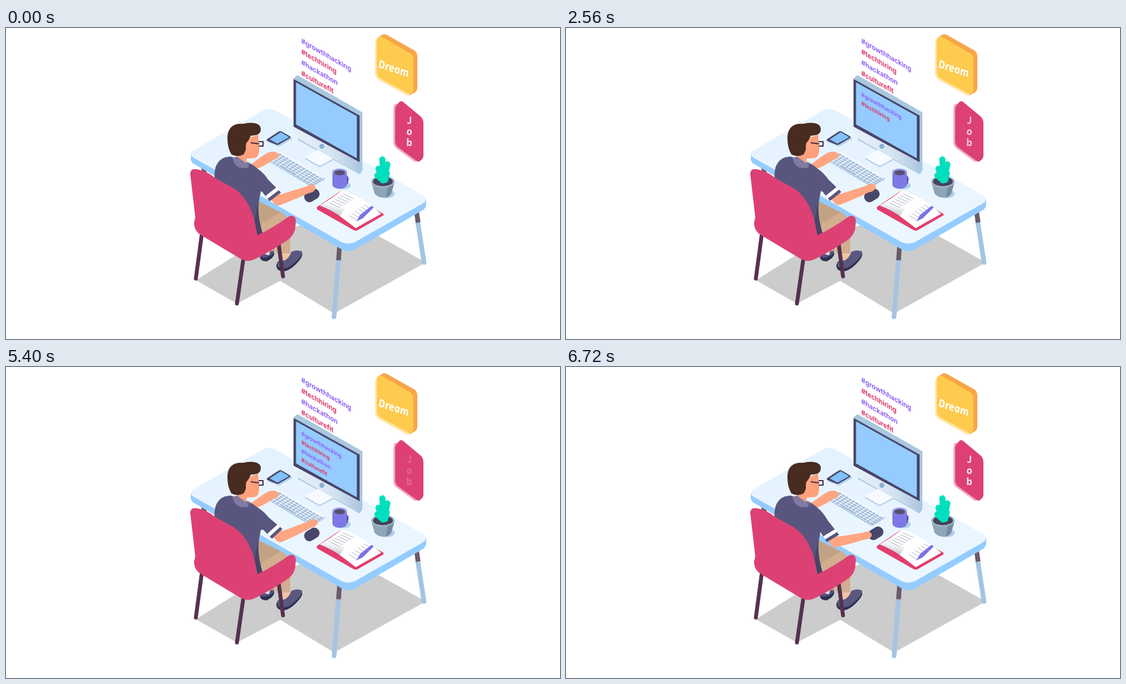
These frames come from a looping animation (998 px wide and 561 px high, 6800 ms). An HTML page:

```html
<!DOCTYPE html>
<html lang="en">
<head>
<meta charset="utf-8">
<title>Desk scene</title>
<style>
html, body { margin: 0; width: 100%; height: 100%; overflow: hidden; background: #fff; }
svg { display: block; width: 100vw; height: 100vh; }
.tags { font: 700 13px Inter, sans-serif; }
.dream { font: italic 600 18.5px "Noto Sans", sans-serif; fill: #fff; }
.job { font: 700 17px "Noto Sans Mono", monospace; fill: #fff; text-anchor: middle; }
.leg { fill: none; stroke-linecap: round; stroke-width: 7; }
</style>
</head>
<body>
<svg viewBox="0 0 998 561">
  <defs>
    <linearGradient id="page" x1=".35" y1="1" x2=".6" y2=".35"><stop offset="0" stop-color="#b9c1ca"/><stop offset=".6" stop-color="#fff"/></linearGradient>
    <linearGradient id="chin"><stop offset="0" stop-color="#e8f1fa"/><stop offset=".6" stop-color="#d5e4f2"/><stop offset="1" stop-color="#afc8e0"/></linearGradient>
    <linearGradient id="top" x2="0" y2="1"><stop offset="0" stop-color="#e3f2ff"/><stop offset="1" stop-color="#edf7ff"/></linearGradient>
  </defs>

  <path fill="#ccc" d="M342 455 416 497 494 456 591 515 756 423 600 335 500 365 430 400Z"/>

  <!-- desk -->
  <g class="leg" style="stroke-width:8.5">
    <path stroke="#a5c4e3" d="M600 405 591 521M741 345 753 423"/>
    <path stroke="#6b5b69" stroke-linecap="butt" d="M601 392 599 419M739 328 742.5 351M356 250 358 268"/>
  </g>
  <path fill="#94ccff" d="M333 226V238Q334 243 340 246L604 399Q617 406 630 399L750 329Q757 325 757 318V308L617 380Z"/>
  <path fill="url(#top)" d="M337 221 462 149Q473 143 486 149L750 301Q763 309 750 317L629 386Q617 392 604 386L338 234Q328 227 337 221Z"/>

  <!-- phone -->
  <path fill="#b9d3ec" d="M471 206 492 214 516 200 512 196Z"/>
  <path fill="#49486a" d="M471 200 491 187Q494 185 497 187L511 195Q514 197 511 199L492 210Q489 212 486 210L471 204Q468 202 471 200Z"/>
  <path fill="#82c1fa" d="M475 201 495 188 510 197 489 208.500Z"/>

  <!-- monitor -->
  <path fill="#a9c5df" d="M526 198 640 260 637 264 526 202Z"/>
  <path fill="#bcd3e8" d="M538 236 562 250Q565 252 568 250L590 238V235L560 220Z"/>
  <path fill="#f7fbff" d="M538 233 562 247Q565 249 568 247L590 235 563 219Z"/>
  <path fill="#a9c7df" d="M518 91 525 85 642 152V257L636 263Z"/>
  <path fill="url(#chin)" d="M518 176 636 239V263L520 196Q518 195 518 191Z"/>
  <path fill="#48466a" d="M518 92 637 158V242L518 178Z"/>
  <path fill="#95cbff" d="M522.500 98 632 159V235L522.500 174Z"/>
  <circle cx="569" cy="213.500" r="4.500" fill="#8fb0d1"/>

  <!-- keyboard -->
  <path fill="#aac6e1" d="M469 238 551 287 574 273V270L492 226Z"/>
  <path fill="#f1f8ff" d="M469 236 551 284 574 270 492 222Z"/>
  <g id="keys" fill="#9fb9d6" transform="matrix(6.1 3.6 -4 2.5 492 225)"></g>

  <!-- mug -->
  <ellipse cx="607" cy="284" rx="14" ry="7" fill="#b4cfe9"/>
  <path fill="none" stroke="#5d57b5" stroke-width="3.500" d="M611 268Q617 267 615 276Q614 283 609 283"/>
  <path fill="#7d78e3" d="M588 259V283Q590 290 601 290Q612 290 614 283V259Z"/>
  <ellipse cx="601" cy="259.500" rx="13" ry="6" fill="#9c97f5"/>
  <ellipse cx="601" cy="261" rx="10" ry="4.500" fill="#57506b"/>

  <!-- plant -->
  <ellipse cx="685" cy="299" rx="15" ry="8" fill="#b4cfe9"/>
  <path fill="#8ea5b9" d="M658 277 664 299Q670 306 679 306Q689 306 694 299L700 277Z"/>
  <path fill="#748da3" d="M688 286 684 306Q691 304 694 299L700 277Z"/>
  <ellipse cx="679" cy="277" rx="21" ry="10.500" fill="#a9bccb"/>
  <ellipse cx="679" cy="277" rx="18" ry="8.500" fill="#46445e"/>
  <path fill="none" stroke="#00dfbd" stroke-width="11" stroke-linecap="round" d="M678 237 680 274M687 246 682 268M671 254 677 270M669 266 679 275M686 262 683 274"/>

  <!-- book -->
  <path fill="#e23e6d" d="M560 323 603 294 680 335V338L633 365Q630 366 627 365L560 327Z"/>
  <path fill="url(#page)" d="M565 320Q583 310 605 293Q613 294 640 308Q618 320 601 339Q589 330 565 320Z"/>
  <path fill="#fff" d="M601 339Q620 311 641 308L676 335 630 361Z"/>
  <g id="rules" stroke="#a3acb8"></g>
  <path fill="#7a72e8" d="M631 349 638 337 657 322Q661 320 662 324L643 343Z"/>

  <!-- legs and shoes -->
  <path fill="#55527a" d="M457 410Q470 407 483 397V409Q480 417 470 420Q459 421 457 410Z"/>
  <path fill="#dbe7f1" d="M462 407 476 401 474 410Z"/>
  <path fill="#2d2f52" d="M457 412Q466 419 484 406 482 414 470 421Q458 421 457 412Z"/>
  <path fill="#c3a184" d="M454 312 500 335 480 355 484 402 470 404 450 370Z"/>
  <path fill="#d2ae8e" d="M461 352 497 332 507 342 512 375V406Q500 411 486 406L484 378 458 378Z"/>
  <path fill="#f1c5a5" d="M492 407H514V413Q508 423 494 422Z"/>
  <path fill="#2d2f52" d="M487 426 533 406Q536 411 526 422 512 438 500 439 488 439 487 429Z"/>
  <path fill="#5a577f" d="M488 424Q490 419 497 420 508 420 514 404 523 399 533 403 535 409 526 418 511 434 500 434 488 434 488 424Z"/>

  <!-- left arm, torso, head -->
  <path id="left" fill="#ffa581" d="M436 250Q463 229 474 224Q489 221 492 229Q492 236 480 238Q463 252 441 257Z"/>
  <path fill="#58567e" d="M376 275C373 248 384 232 405 232L438 243Q454 252 464 266L458 300Q450 330 462 370L453 376 415 330Z"/>
  <path fill="#454468" d="M456 306Q450 330 462 370L453 376 448 345Z"/>
  <path fill="#ffa07b" d="M416 220 435 200 454 192 456 214Q457 230 450 234Q442 236 434 235L433 245 416 236Z"/>
  <path fill="#7f7ba3" d="M408 234 416 232 433 244 438 242 441 252 424 253Q410 249 408 234Z"/>
  <path fill="#482b21" d="M399 201C398 182 408 171 427 173C440 169 460 170 459 183C459 192 450 194 441 194Q437 204 433 207Q433 222 428 228Q417 234 406 228Q399 216 399 201Z"/>
  <ellipse cx="437" cy="213" rx="5" ry="8" fill="#ffa581"/>
  <path fill="none" stroke="#412640" stroke-width="2" d="M441 207 456 209M455 205 463 205V213L455 213"/>

  <!-- mouse and right arm -->
  <rect id="mouse" x="-14.500" y="-9.500" width="29" height="19" rx="9" fill="#48466a"/>
  <path id="forearm" fill="#ffa581"/>
  <path id="elbow" stroke="#ffa581" stroke-width="18" stroke-linecap="round"/>
  <ellipse id="hand" rx="10" ry="7" fill="#ffa581"/>
  <path id="sleeve" fill="#58567e"/>
  <path id="band" stroke="#fff" stroke-width="6.500"/>

  <!-- chair -->
  <path class="leg" stroke="#553150" d="M353 370 342 452M428 414 416 497M491 388 499 448"/>
  <path fill="#dd4174" d="M332 264C332 256 336 253 345 255Q362 258 376 270L410 289Q436 306 447 345L453 374Q485 358 508 341C516 336 523 340 522 350L521 362Q518 376 505 384Q470 407 450 416Q436 424 422 416L352 374Q338 366 339 350L341 342Z"/>

  <!-- wall tiles -->
  <path fill="#ffe5a6" d="M665 28Q665 15 676 20L724 48Q731 52 731 61V114Q731 125 721 121L673 95Q665 90 665 82Z"/>
  <path fill="#f7a549" d="M669 18 678 12Q682 10 687 13L735 40Q741 44 741 52V107Q741 113 737 116L728 121Z"/>
  <path fill="#ffcb4e" d="M668 25Q668 12 679 17L727 45Q734 49 734 58V111Q734 122 724 118L676 92Q668 87 668 79Z"/>
  <text class="dream" transform="matrix(.94 .31 0 1.1 671 71)">Dream</text>
  <path fill="#f1a9c2" transform="translate(-3 2)" d="M701 147 702 136 712 133 745 158 752 230 740 240 706 215Q701 211 701 204Z"/>
  <path fill="#dd4174" d="M701 147Q701 142 705 138L709 133Q711 131 715 133L745 158Q752 163 752 172V230Q752 235 748 238Q744 243 740 240L706 215Q701 211 701 204Z"/>
  <g id="job" class="job"><text x="726.500" y="173">J</text><text x="726.500" y="193">o</text><text x="726.500" y="213">b</text></g>

  <g id="fixed" class="tags" transform="translate(532 27)"></g>
  <g id="moving" class="tags"></g>
</svg>
<script>
const $ = id => document.getElementById(id);
const set = (id, attrs) => { for (const k in attrs) $(id).setAttribute(k, attrs[k]); };
const clamp = v => Math.max(0, Math.min(1, v));
const words = ['#growthhacking', '#techhiring', '#hackathon', '#culturefit'];

$('fixed').innerHTML = $('moving').innerHTML = words.map((w, i) =>
  `<text transform="matrix(.866 .5 0 1 0 ${i * 19.4})" fill="${i % 2 ? '#dc3a6b' : '#9162f6'}">${w}</text>`).join('');

let keys = '';
for (let r = 0; r < 5; r++)
  for (let c = 0; c < 13; c++)
    if (r < 4 || c < 3 || c > 7) keys += `<rect x="${c + .2}" y="${r + .15}" width=".76" height=".72"/>`;
$('keys').innerHTML = keys + '<rect x="3.2" y="4.15" width="4.76" height=".72"/>';

let rules = '';
for (let i = 0; i < 6; i++)
  rules += `<path d="M${582 + i * 5} ${315 - i * 3.2}l20 9M${618 + i * 5.5} ${338 - i * 3.8}l14 9"/>`;
$('rules').innerHTML = rules;

// Poses: elbow x, y, hand x, y, mouse x, y
const typing = [499, 300, 554, 271, 551, 302];
const hover = [494, 307, 552, 282, 551, 302];
const home = [490, 311, 548, 290, 551, 302];
const far = [490, 312, 546, 294, 562, 291];
const low = [485, 316, 541, 304, 558, 300];
const armKeys = [[0, home], [200, home], [720, typing], [2200, typing], [2640, home], [3000, low],
  [3360, far], [3680, low], [3900, home], [4240, typing], [5080, typing], [5400, hover],
  [5600, home], [5800, low], [6120, far], [6480, low]];

// Tag group: x, y, horizontal scale, vertical scale
const onScreen = [532, 123, .806, .81];
const tagKeys = [[5600, onScreen], [6120, [538, 58, .81, .93]], [6440, [532, 27, 1, 1]]];

function tween(list, t) {
  const i = list.findIndex(k => k[0] > t);
  if (i < 0) return list[list.length - 1][1];
  if (i === 0) return list[0][1];
  const [t0, a] = list[i - 1], [t1, b] = list[i];
  const p = (t - t0) / (t1 - t0), e = p * p * (3 - 2 * p);
  return a.map((v, j) => v + (b[j] - v) * e);
}

function drawArm(t) {
  let [ex, ey, hx, hy, mx, my] = tween(armKeys, t);
  const within = (a, b) => t > a && t < b;
  if (within(720, 2200) || within(4240, 5080)) hy += 1.5 * Math.sin(t / 55);
  const tap = within(760, 2200) || within(3560, 5080) ? 1.5 * Math.sin(t / 48) : 0;
  set('left', { transform: `translate(0 ${tap})` });
  set('mouse', { transform: `translate(${mx} ${my}) rotate(-32)` });

  const len = Math.hypot(hx - ex, hy - ey), nx = (ey - hy) / len, ny = (hx - ex) / len;
  set('forearm', { d: `M${ex - nx * 9} ${ey - ny * 9}L${hx - nx * 6} ${hy - ny * 6}L${hx + nx * 6} ${hy + ny * 6}` +
    `Q${(ex + hx) / 2 + nx * 9} ${(ey + hy) / 2 + ny * 9} ${ex + nx * 9} ${ey + ny * 9}Z` });
  set('hand', { transform: `translate(${hx} ${hy}) rotate(${Math.atan2(hy - ey, hx - ex) * 57.3})` });

  // Upper arm, measured back from the elbow along the shoulder line
  const sx = 452, sy = 262, d = Math.hypot(ex - sx, ey - sy), ux = (ex - sx) / d, uy = (ey - sy) / d;
  const point = (back, side) => `${ex - ux * back + uy * side} ${ey - uy * back - ux * side}`;
  set('elbow', { d: `M${point(10, 0)}L${ex} ${ey}` });
  set('sleeve', { d: `M436 246Q458 252 ${point(40, 9)}L${point(8, 13)}L${point(8, -13)}L${point(30, -13)}L446 292Z` });
  set('band', { d: `M${point(17, 12.5)}L${point(17, -13)}` });
}

function frame(now) {
  const t = Math.min(6720, Math.floor(now % 6800 / 40) * 40);
  drawArm(t);
  set('job', { opacity: .5 - .5 * Math.cos((t - 960) / 2400 * 2 * Math.PI) });
  const [x, y, sx, sy] = tween(tagKeys, t);
  set('fixed', { opacity: t < 5600 ? 1 : 0 });
  set('moving', { transform: `matrix(${sx} 0 0 ${sy} ${x} ${y})` });
  [...$('moving').children].forEach((row, i) =>
    row.setAttribute('opacity', clamp((t - 480 - i * 1060) / 80)));
  requestAnimationFrame(frame);
}
frame(0);
</script>
</body>
</html>
```
